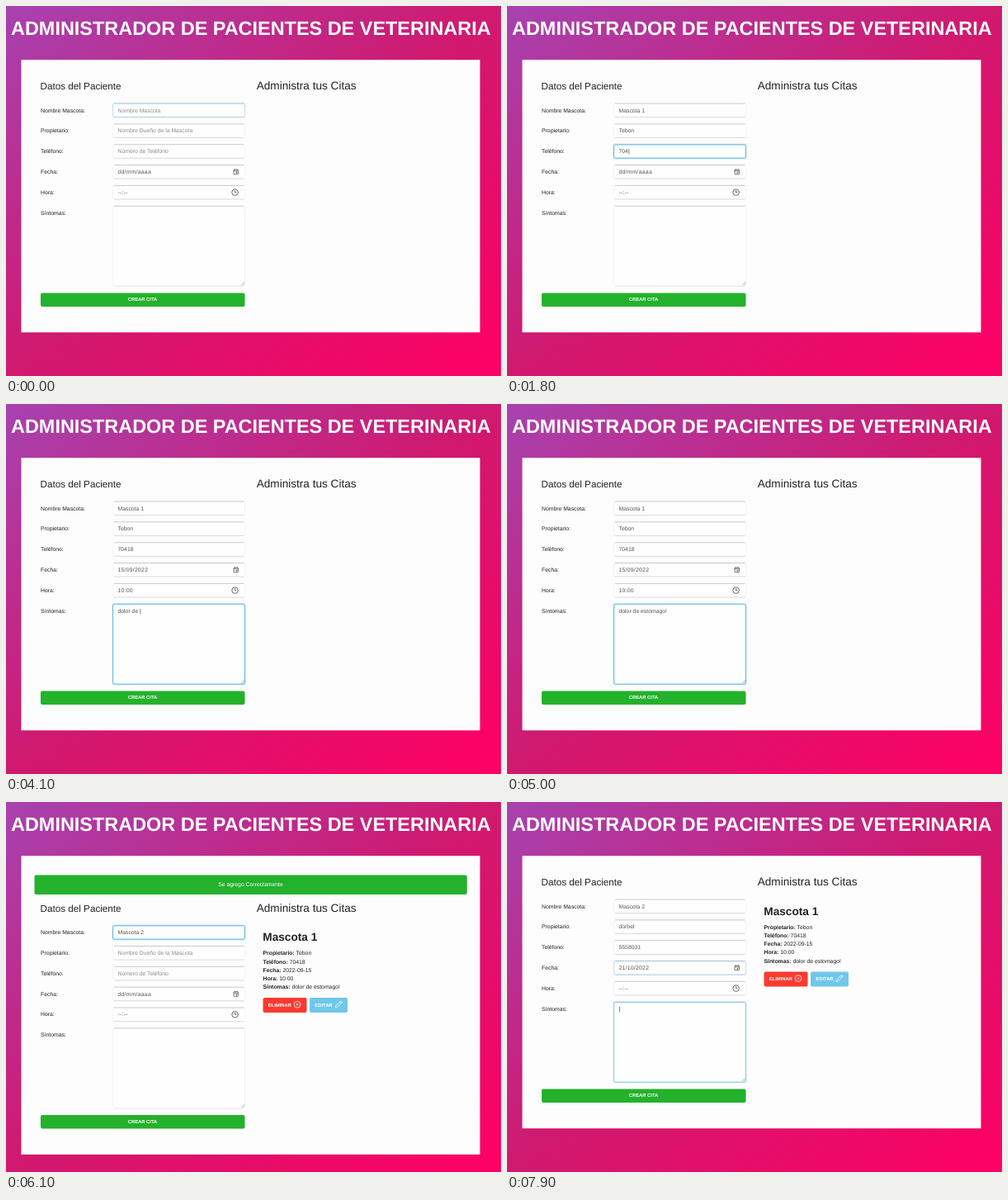
These frames come from a looping animation (600 px wide and 448 px high, 8000 ms). An HTML page:

```html
<!DOCTYPE html>
<html lang="es">
<head>
<meta charset="utf-8">
<style>
  html, body { margin: 0; width: 100%; height: 100%; overflow: hidden; }
  svg { display: block; width: 100vw; height: 100vh; }
  text {
    font: 6.84px "Liberation Sans", Arial, sans-serif;
    white-space: pre;
    text-rendering: geometricPrecision;
  }
</style>
</head>
<body>
<svg id="stage" viewBox="0 0 600 448" preserveAspectRatio="none">
  <defs>
    <linearGradient id="bg" gradientUnits="userSpaceOnUse" x1="86" y1="-63" x2="514" y2="511">
      <stop offset="0" stop-color="#a742b0"/>
      <stop offset=".5" stop-color="#d0196f"/>
      <stop offset="1" stop-color="#ff0064"/>
    </linearGradient>
  </defs>
  <rect width="600" height="448" fill="url(#bg)"/>
  <text x="6" y="35.2" fill="#fff" style="font-size:23.45px;font-weight:bold">ADMINISTRADOR DE PACIENTES DE VETERINARIA</text>
  <g id="app"></g>
</svg>
<script>
const LOOP = 8000, STEP = 100, ROW = 24.85, SHIFT = 31.6;
const SAVED_AT = 5200, ALERT_END = 6200;
const app = document.getElementById('app');
const GREEN = '#24b12b', INK = '#222', VALUE = '#555', HINT = '#8c8c8c';

const fields = [
  { label: 'Nombre Mascota:', hint: 'Nombre Mascota', focus: [[-50, 900], [5300, 6100]],
    typing: [['Mascota 1', 100, 80], ['Mascota 2', 5550, 55]] },
  { label: 'Propietario:', hint: 'Nombre Dueño de la Mascota', focus: [[900, 1450], [6100, 6500]],
    typing: [['Tebon', 900, 100], ['dorbel', 6100, 60]] },
  { label: 'Teléfono:', hint: 'Número de Teléfono', focus: [[1450, 2100], [6500, 7300]],
    typing: [['70418', 1500, 100], ['5558031', 6500, 100]] },
  { label: 'Fecha:', hint: 'dd/mm/aaaa', icon: calendar, focus: [[2100, 2800], [7300, 7800]],
    steps: [[2600, '15/09/2022'], [SAVED_AT, ''], [7600, '21/10/2022']] },
  { label: 'Hora:', hint: '--:--', icon: clock, focus: [[2800, 3400]],
    steps: [[3000, '10:--'], [3200, '10:00'], [SAVED_AT, '']] },
  { label: 'Síntomas:', hint: '', area: true, focus: [[3400, 5000], [7800, LOOP]],
    typing: [['dolor de estomago!', 3400, 700 / 9]] }
];

function text(x, y, str, { size = 6.84, fill = INK, bold, anchor = 'start', gap = 0 } = {}) {
  return `<text x="${x}" y="${y}" fill="${fill}" text-anchor="${anchor}" style="font-size:${size}px;` +
    `font-weight:${bold ? 'bold' : 'normal'};letter-spacing:${gap}px">${str}</text>`;
}

function rect(x, y, w, h, fill, extra = '') {
  return `<rect x="${x}" y="${y}" width="${w}" height="${h}" fill="${fill}" ${extra}/>`;
}

function line(d, stroke, width = 0.8) {
  return `<path d="${d}" fill="none" stroke="${stroke}" stroke-width="${width}"/>`;
}

function calendar(y) {
  return rect(276, y - 2.6, 5.4, 5.6, 'none', 'rx=".5" stroke="#555" stroke-width=".8"') +
    line(`M276 ${y - 1}h5.4M277.4 ${y - 3.5}v1M280.1 ${y - 3.5}v1`, '#555') +
    rect(278.6, y + 0.3, 1.6, 1.5, '#555');
}

function clock(y) {
  return `<circle cx="277.6" cy="${y}" r="3.8" fill="none" stroke="#444" stroke-width=".8"/>` +
    line(`M277.6 ${y - 2.4}v2.5h1.9`, '#444');
}

// Focus ring fades in and out over 150 ms.
function ringAlpha(spans, t) {
  return Math.max(0, ...spans.map(([from, to]) =>
    t < from ? 0 : t < to ? Math.min(1, (t - from) / 150) : 1 - (t - to) / 150));
}

function valueAt(field, t) {
  if (field.steps) return field.steps.filter(s => s[0] <= t).map(s => s[1]).pop() || '';
  const round = field.typing[t < SAVED_AT ? 0 : 1];
  if (!round) return '';
  const [str, start, pace] = round;
  return str.slice(0, Math.max(0, Math.floor((t - start) / pace + 0.01)));
}

function drawField(field, i, t) {
  const mid = 126.2 + i * ROW, top = mid - 8.2, h = field.area ? 97 : 16.6;
  const bottom = top + h, base = mid + 2.3;
  const focused = field.focus.some(([from, to]) => t >= from && t < to);
  const alpha = ringAlpha(field.focus, t), value = valueAt(field, t);

  let out = text(42, base, field.label);
  out += rect(129.5, top, 160, h, '#fefefe', 'rx="2" stroke="#f1f1f1" stroke-width=".7"');
  out += line(`M131 ${top}H288.5`, '#c2c2c2') + line(`M131 ${bottom}H288.5`, field.area ? '#e6e6e6' : '#d6d6d6');
  if (alpha) {
    out += `<g opacity="${alpha}">` +
      rect(129.5, top, 160, h, 'none', 'rx="2" stroke="#cfeaf7" stroke-width="2.4"') +
      rect(129.5, top, 160, h, 'none', 'rx="2" stroke="#74c0e4" stroke-width="1"') + '</g>';
  }

  const picker = !!field.steps, isDate = field.icon === calendar;
  const caret = focused && !picker && (value || field.area) ? '<tspan fill="#222">|</tspan>' : '';
  const selected = isDate && focused && t < SAVED_AT;
  const shown = value || field.hint;
  const style = { fill: value || picker ? VALUE : HINT, gap: picker ? 0.25 : 0 };
  if (selected) out += rect(135.3, mid - 4.5, 8.8, 9, '#2f78c4');
  const body = selected ? `<tspan fill="#fff">${shown.slice(0, 2)}</tspan>${shown.slice(2)}` : shown;
  out += text(135.5, base, body + caret, style);
  if (field.icon) out += field.icon(mid);
  if (field.area) out += line(`M285 ${bottom - 1}l4 -4M287.2 ${bottom - 1}l1.8 -1.8`, '#999', 0.7);
  return out;
}

function button(x, y, w, h, fill, label, labelX, anchor) {
  return rect(x, y, w, h, fill, 'rx="2"') +
    text(labelX, y + h / 2 + 1.7, label, { size: 5.83, fill: '#fff', bold: true, anchor });
}

function drawAppointment() {
  const rows = [['Propietario:', 'Tebon'], ['Teléfono:', '70418'], ['Fecha:', '2022-09-15'],
    ['Hora:', '10:00'], ['Síntomas:', 'dolor de estomago!']];
  let out = text(311.3, 136.8, 'Mascota 1', { size: 13.65, bold: true });
  rows.forEach(([name, value], i) => {
    out += text(311.5, 153.8 + i * 10.2, `<tspan style="font-weight:bold">${name}</tspan> ${value}`);
  });
  out += button(311.5, 205.5, 53, 18, '#fb3a30', 'ELIMINAR', 317.8);
  out += '<circle cx="353" cy="213.6" r="3.9" fill="none" stroke="#fff" stroke-width=".8"/>' +
    line('M351.7 212.3l2.6 2.6m0 -2.6l-2.6 2.6', '#fff');
  out += button(368, 205.5, 46, 18, '#70c7ea', 'EDITAR', 374.3);
  out += line('M399 217.6l.8 -2.6 6 -5.8 1.7 1.7 -6 5.8zM404.4 210.5l1.7 1.7', '#fff');
  return out;
}

function draw(t) {
  const alert = t >= SAVED_AT && t < ALERT_END, dy = alert ? SHIFT : 0;
  let out = rect(18.5, 65.2, 556, 330 + dy, '#fefdfd');
  if (alert) {
    out += rect(34.5, 88.5, 524.3, 23.5, GREEN, 'rx="2"') +
      text(296.5, 101.6, 'Se agrego Correctamente', { fill: '#fff', anchor: 'middle' });
  }
  out += `<g transform="translate(0 ${dy})">`;
  out += text(41.5, 101.2, 'Datos del Paciente', { size: 11.7 });
  out += text(303.7, 101, 'Administra tus Citas', { size: 13.6 });
  out += fields.map((field, i) => drawField(field, i, t)).join('');
  out += button(42, 347.5, 247.5, 16.5, GREEN, 'CREAR CITA', 165.5, 'middle');
  if (t >= SAVED_AT) out += drawAppointment();
  app.innerHTML = out + '</g>';
}

let shownAt = -1;
const start = performance.now();
function tick() {
  const t = Math.floor(((performance.now() - start) % LOOP) / STEP) * STEP;
  if (t !== shownAt) draw(shownAt = t);
  requestAnimationFrame(tick);
}
tick();
</script>
</body>
</html>
```
